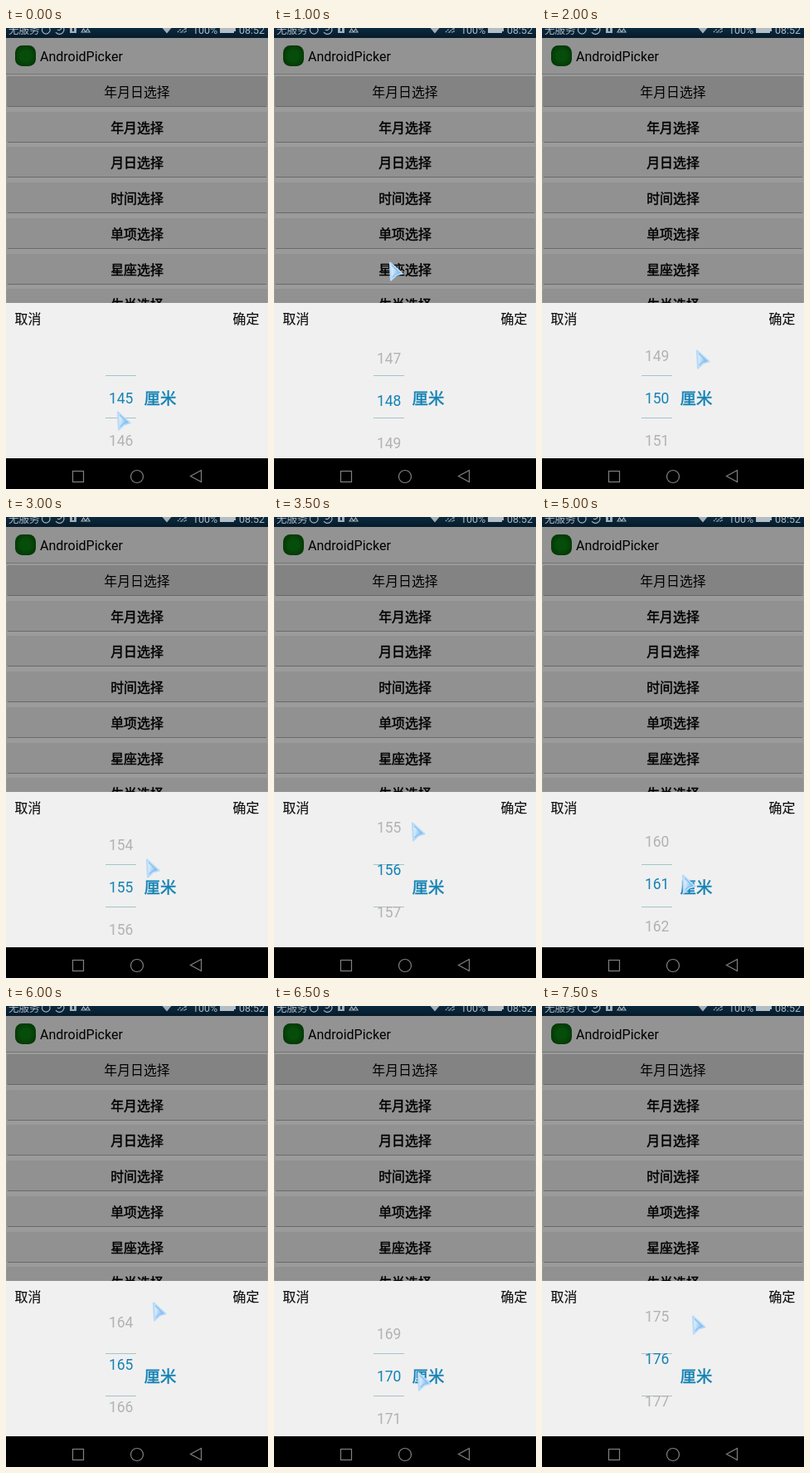
Animation of 316x555 px, one loop 8000 ms. Source, as an HTML page:

```html
<!DOCTYPE html>
<html lang="zh-CN">
<head>
<meta charset="utf-8">
<title>Height picker</title>
<style>
  html, body { margin: 0; width: 100%; height: 100%; overflow: hidden; background: #000; }
  svg { display: block; width: 316px; height: 555px; font-family: Roboto, "Noto Sans CJK SC", "Noto Sans CJK", sans-serif; }
  .status { font-size: 12.5px; fill: #aeb9c1; }
  .status-icon { fill: none; stroke: #a3afb8; stroke-width: 1.2; }
  .button-label { font-size: 15.9px; text-anchor: middle; fill: #000; }
  .bold { stroke: #000; stroke-width: .45; }
  .action { font-size: 15.9px; fill: #111; stroke: #111; stroke-width: .15; }
  .row { font-size: 17.5px; text-anchor: middle; }
  .unit { font-size: 19.4px; fill: #1482b4; stroke: #1482b4; stroke-width: .45; }
  .nav { fill: none; stroke: #808080; stroke-width: 1.2; }
</style>
</head>
<body>
<svg viewBox="0 0 316 555">
  <defs>
    <linearGradient id="statusFill" x2="0" y2="1">
      <stop offset="0" stop-color="#0b2a40"/><stop offset="1" stop-color="#061b2a"/>
    </linearGradient>
    <radialGradient id="iconFill">
      <stop offset=".5" stop-color="#064c0a"/><stop offset="1" stop-color="#043a06"/>
    </radialGradient>
    <linearGradient id="cursorFill" x2="1" y2=".3">
      <stop offset="0" stop-color="#e6f2fd"/><stop offset=".35" stop-color="#cfe6fb"/><stop offset=".8" stop-color="#86bff0"/>
    </linearGradient>
    <clipPath id="above"><rect x="115" y="367" width="48" height="51"/></clipPath>
    <clipPath id="band"><rect x="115" y="418" width="48" height="51"/></clipPath>
    <clipPath id="below"><rect x="115" y="469" width="48" height="49"/></clipPath>
  </defs>

  <rect width="316" height="331" fill="#9b9b9b"/>
  <rect width="316" height="12" fill="url(#statusFill)"/>
  <g class="status">
    <text x="3" y="6.500">无服务</text>
    <text x="225" y="6.500">100%</text>
    <text x="281" y="6.500">08:52</text>
  </g>
  <g class="status-icon">
    <path d="M44 0a4.800 4.800 0 1 0 8.500 0M60 5a5 5 0 0 0 9-6M62 2q3 2 5-2M91 5l2.500-4l2.500 4zM96 5l2.500-4l2.500 4z"/>
    <path d="M207 5l4-4M211 5h6v-5z" stroke-dasharray="2 1"/>
  </g>
  <path d="M188.500 0q5.500-4 11 0l-5.500 6.500zM77-1h8v7h-8z" fill="#a3afb8"/>
  <path d="M80 0h2v4h-2z" fill="#0b2a40"/>
  <path d="M258-2h17v8h-17zM275 0h2v4h-2z" fill="#b5bec4"/>

  <rect y="12" width="316" height="43" fill="#939393"/>
  <rect y="55" width="316" height="1" fill="#747474"/>
  <rect x="11" y="21" width="25" height="25" rx="8.500" fill="url(#iconFill)"/>
  <text x="41" y="40" font-size="16">AndroidPicker</text>

  <g id="buttons"></g>

  <rect y="331" width="316" height="187" fill="#f0f0f0"/>
  <text class="action" x="10.500" y="356">取消</text>
  <text class="action" x="273.500" y="356">确定</text>
  <path d="M120 418.500h37M120 469.500h37" stroke="#a3c5c8"/>
  <g id="wheel"></g>
  <text class="unit" x="166.500" y="452.800">厘米</text>

  <rect y="518" width="316" height="37" fill="#000"/>
  <g class="nav">
    <rect x="80.500" y="533.500" width="13" height="13"/>
    <circle cx="158" cy="540" r="7.500"/>
    <path d="M235.500 532.500v14l-13-7z"/>
  </g>

  <g id="cursor" stroke-linejoin="round">
    <path d="M2 1.500L16.500 14.500L9.500 16.500L3 22.500Z" fill="url(#cursorFill)" stroke="#b9dbf8" stroke-width="2.200"/>
    <path d="M4 5L14 14L8.500 15.500L4.500 19" fill="none" stroke="#86bff0" stroke-width="1.200"/>
  </g>
</svg>
<script>
const NS = "http://www.w3.org/2000/svg";
const STEP = 500, ROW = 51, CENTER = 445;

// [wheel value, cursor left, cursor top], held for one step each
const poses = [
  [145, 133, 461], [146, 150, 386], [147.94, 138, 281], [148.31, 138, 470],
  [150, 185, 387], [153, 160, 487], [155, 168, 411], [156.4, 165, 367],
  [157.95, 162, 452], [160, 160, 346], [161.07, 168, 430], [164.98, 183, 219],
  [165.27, 176, 356], [170, 172, 440], [174.02, 177, 304], [176.41, 180, 372]
];

function add(parent, tag, attrs, text = "") {
  const node = document.createElementNS(NS, tag);
  for (const key in attrs) node.setAttribute(key, attrs[key]);
  node.textContent = text;
  return parent.appendChild(node);
}

const buttons = document.getElementById("buttons");
["年月日", "年月", "月日", "时间", "单项", "星座", "生肖"].forEach((kind, i) => {
  const y = 58 + Math.round(i * 42.7);
  add(buttons, "rect", { x: 1, y, width: 314, height: 37, rx: 1.5, fill: i ? "#919191" : "#838383" });
  add(buttons, "rect", { x: 2, y: y + 36, width: 312, height: 1, fill: "#6a6a6a" });
  add(buttons, "text", { class: i ? "button-label bold" : "button-label", x: 158, y: y + 25.3 }, kind + "选择");
});

const wheel = document.getElementById("wheel");
const zones = [["above", "#b2b2b2"], ["band", "#1482b4"], ["below", "#b2b2b2"]].map(([clip, fill]) => {
  const group = add(wheel, "g", { "clip-path": `url(#${clip})`, fill });
  return [-2, -1, 0, 1, 2].map(offset => ({ offset, node: add(group, "text", { class: "row", x: 138.7 }) }));
});
const cursor = document.getElementById("cursor");

function draw(time) {
  const [value, x, y] = poses[Math.floor(time / STEP) % poses.length];
  const middle = Math.round(value);
  for (const { offset, node } of zones.flat()) {
    const n = middle + offset;
    node.textContent = n < 145 ? "" : n;
    node.setAttribute("y", CENTER + 6.5 + (n - value) * ROW);
  }
  cursor.setAttribute("transform", `translate(${x} ${y})`);
}

const start = performance.now();
function tick() {
  draw(performance.now() - start);
  requestAnimationFrame(tick);
}
tick();
</script>
</body>
</html>
```
